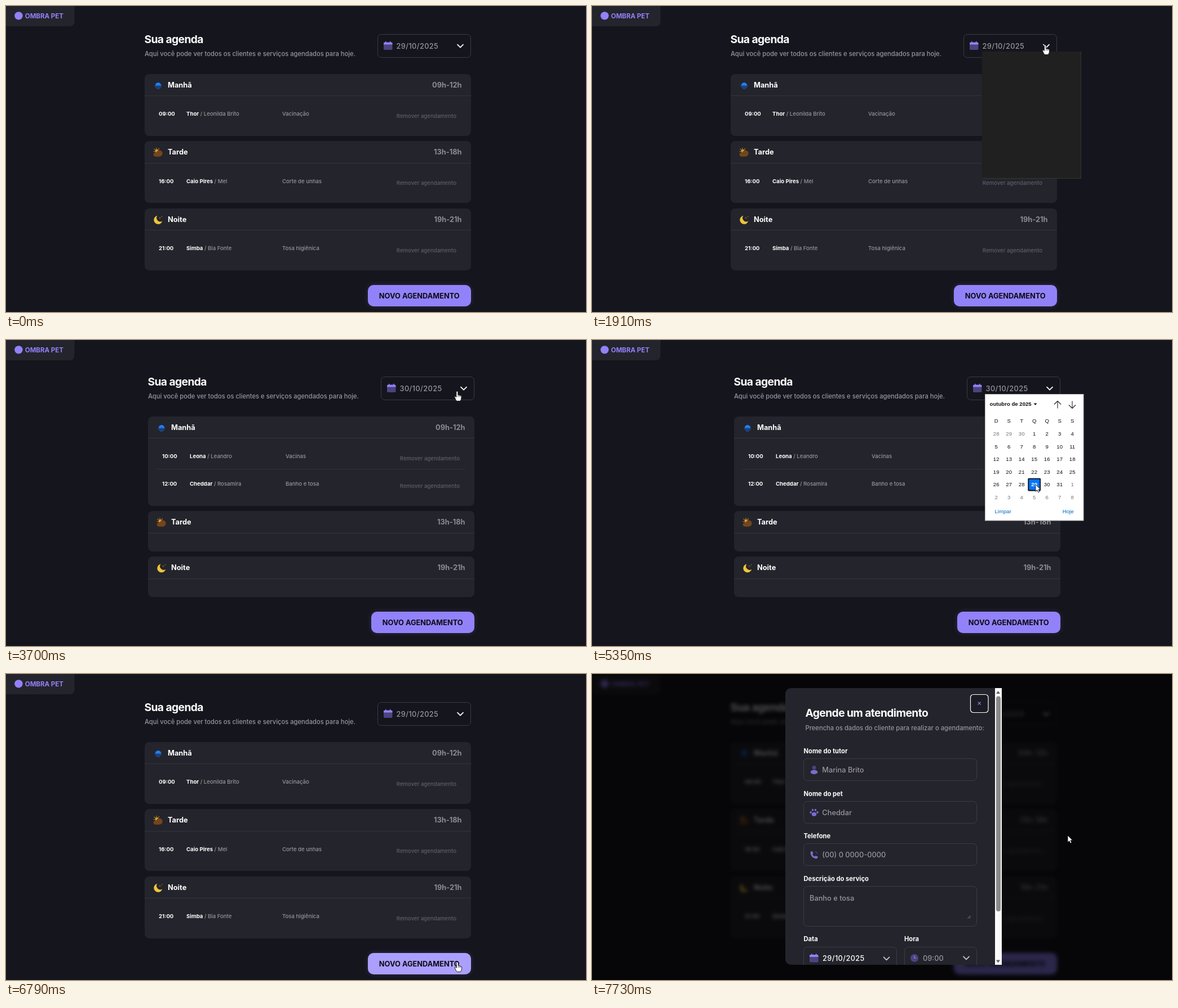
An HTML page for the animation above (8000 ms loop, 1029x544 px).

```html
<!DOCTYPE html>
<html lang="pt-BR">
<head>
<meta charset="utf-8">
<title>Agenda</title>
<style>
  html, body { margin: 0; width: 100%; height: 100%; overflow: hidden; background: #15151d; }
  svg { display: block; width: 1029px; height: 544px; }
  text { font-family: Inter, sans-serif; font-optical-sizing: none; white-space: pre; }
  .cal text { font-family: "Liberation Sans", Arial, sans-serif; }
  .button { filter: drop-shadow(0 0 4px rgba(146, 130, 250, .2)); }
</style>
</head>
<body>
<svg id="stage" viewBox="0 0 1029 544" xmlns="http://www.w3.org/2000/svg"></svg>
<script>
const LOOP = 8000;
const C = {
  bg: '#15151d', card: '#24242c', line: '#34343c', border: '#3b3b43', brand: '#9282fa', hover: '#ab9ffd',
  deep: '#4a4480', white: '#fff', soft: '#98959d', faint: '#5f5e68', blue: '#0067c0'
};

// ---- markup helpers ----
const attrs = o => Object.entries(o).map(([k, v]) => ` ${k}="${v}"`).join('');
const rect = (x, y, width, height, fill, rx = 0, more = {}) =>
  `<rect${attrs({ x, y, width, height, fill, rx, ...more })}/>`;
const outline = (x, y, w, h, r, color = C.border, width = 1) =>
  rect(x, y, w, h, 'none', r, { stroke: color, 'stroke-width': width });
const path = (d, fill, more = {}) => `<path${attrs({ d, fill, ...more })}/>`;
const stroke = (d, color, width = 1, more = {}) =>
  path(d, 'none', { stroke: color, 'stroke-width': width, ...more });
const dot = (cx, cy, r, fill) => `<circle${attrs({ cx, cy, r, fill })}/>`;
const oval = (cx, cy, rx, ry, fill) => `<ellipse${attrs({ cx, cy, rx, ry, fill })}/>`;
const group = (content, more = {}) => `<g${attrs(more)}>${content}</g>`;
const at = (x, y, content) => group(content, { transform: `translate(${x} ${y})` });

// y is the middle of the capitals; baselines sit on whole pixels
const text = (x, y, str, size, fill, weight = 500, more = {}) =>
  `<text${attrs({ x, y: Math.round(y + size * .364), 'font-size': size, fill, 'font-weight': weight, ...more })}>${str}</text>`;
const END = { 'text-anchor': 'end' }, MID = { 'text-anchor': 'middle' };
const TITLE = { 'letter-spacing': -.57 }, DATE = { 'letter-spacing': .4 };

const chevron = (x, y, color) =>
  stroke(`M${x - 5} ${y - 2.6}l5 5 5-5`, color, 1.8, { 'stroke-linecap': 'round', 'stroke-linejoin': 'round' });
const calendarIcon = (x, y) => at(x, y,
  rect(0, 2, 15.5, 13, C.deep, 1.8) + path('M0 5.6V3.4Q0 1.6 1.8 1.6H13.7Q15.5 1.6 15.5 3.4V5.6z', C.brand) +
  stroke('M3.8 .3V3M11.7 .3V3', C.brand, 1.4, { 'stroke-linecap': 'round' }));

// ---- schedule ----
const icons = [
  stroke('M-6.5 1.8H6.5M-5 4H5M-3 6.2H3', '#1a56b8', 1.2) +
    stroke('M-7.5-3l1.5 1M7.5-3L6-2M0-8v1.5', '#173a78', 1.1) + path('M-5.2 .8a5.2 5.5 0 0 1 10.4 0z', '#2080f0'),
  dot(-2.5, -2.5, 3, '#d99a2c') +
    stroke('M-3-8v1.6M-7-6l1.3 1.2M-8-1.5h1.6M1.5-6.5L.5-5.3', '#c98d28', 1.1, { 'stroke-linecap': 'round' }) +
    path('M-5 7.5a3.6 3.6 0 0 1-1-7q1.5-.5 2.6 0a5.6 5.6 0 1 1 5.6 7z', '#74451b'),
  path('M-1.5-7A7.6 7.6 0 1 0 7.2 2.6 6.6 6.6 0 0 1-1.5-7z', '#eec53a') +
    stroke('M3-4.8v3.2M1.4-3.2h3.2M6.6-6.6v2M5.6-5.6h2', '#75612a', 1)
];
const periods = [['Manhã', '09h-12h'], ['Tarde', '13h-18h'], ['Noite', '19h-21h']];

function schedule(days) {
  let y = 120.6, out = '';
  days.forEach((rows, i) => {
    const height = 71.4 + (rows.length ? 38.6 + 49 * (rows.length - 1) : 0);
    const top = Math.round(y);
    out += rect(246, top, 579, Math.round(y + height) - top, C.card, 8) +
      stroke(`M246 ${Math.floor(y + 39) + .5}H825`, C.line, 1);
    out += at(270, y + 20, icons[i]);
    out += text(287, y + 19.6, periods[i][0], 12.8, C.white, 700);
    out += text(808.5, y + 19.6, periods[i][1], 12.8, '#8d8b93', 700, END);
    rows.forEach(([time, pet, owner, service], r) => {
      const ry = y + 71.1 + 49 * r;
      if (r) out += stroke(`M261.5 ${Math.floor(ry - 26) + .5}H808.5`, C.line, 1);
      out += text(271, ry, time, 9.6, C.white, 700) +
        text(320, ry, `${pet}<tspan font-weight="500" fill="${C.soft}"> / ${owner}</tspan>`, 9.6, C.white, 700) +
        text(490, ry, service, 9.6, C.soft) +
        text(799, ry + 3.6, 'Remover agendamento', 9.6, C.faint, 500, { ...END, class: 'remove', 'data-y': ry + 3.6 });
    });
    y += height + 9.6;
  });
  const by = Math.round(y + 16.5);
  return out + rect(642, by, 183, 38, C.brand, 10, { class: 'button', 'data-y': by }) +
    text(733.3, by + 19.3, 'NOVO AGENDAMENTO', 12.8, '#0c0b14', 700, MID);
}

const dayOne = schedule([
  [['09:00', 'Thor', 'Leonilda Brito', 'Vacinação']],
  [['16:00', 'Caio Pires', 'Mel', 'Corte de unhas']],
  [['21:00', 'Simba', 'Bia Fonte', 'Tosa higiênica']]
]);
const dayTwo = schedule([
  [['10:00', 'Leona', 'Leandro', 'Vacinas'], ['12:00', 'Cheddar', 'Rosamira', 'Banho e tosa']], [], []
]);

const header =
  text(245.5, 59, 'Sua agenda', 19.2, C.white, 700, TITLE) +
  text(246, 85.3, 'Aqui você pode ver todos os clientes e serviços agendados para hoje.', 11.2, C.soft) +
  outline(659.5, 50.5, 165, 41, 6.4) + calendarIcon(670, 63) +
  text(692.5, 71, '', 12.8, C.soft, 500, { ...DATE, id: 'date' }) + chevron(806, 71.2, C.white);

// ---- date picker ----
const cellX = i => 20.2 + 22.5 * (i % 7), cellY = i => 71 + 22.5 * Math.floor(i / 7);
function picker() {
  let out = rect(.5, .5, 174.5, 224.5, C.white, 0, { stroke: '#b8b8b8' }) +
    text(8.6, 18, 'outubro de 2025', 9.6, '#101010', 700) + path('M86.5 16.5h6l-3 3.4z', '#101010') +
    stroke('M129 25.5v-13M123 18.5l6-6 6 6M155 12.5v13M149 19.5l6 6 6-6', '#202020', 1.1);
  [...'DSTQQSS'].forEach((d, i) => out += text(cellX(i), 48, d, 9.6, '#101010', 400, MID));
  for (let i = 0; i < 42; i++) {
    const n = i - 2, inside = n > 0 && n < 32;
    out += text(cellX(i), cellY(i), inside ? n : n < 1 ? n + 30 : n - 31, 9.6, inside ? '#101010' : '#767676', 400, MID);
  }
  out += outline(cellX(31) - 10.7, cellY(31) - 10.7, 21.4, 21.4, 0, '#606060');
  for (const day of [29, 30]) {
    const x = cellX(day + 2), y = cellY(day + 2);
    out += group(rect(x - 10.3, y - 10.3, 20.8, 20.8, '#0075ff', 1, { stroke: '#101010', 'stroke-width': 1.8 }) +
      text(x, y, day, 9.6, C.white, 700, MID), { id: 'pick' + day });
  }
  return out + text(17.5, 208.5, 'Limpar', 9.6, C.blue, 400) + text(157.5, 208.5, 'Hoje', 9.6, C.blue, 400, END) +
    rect(0, 0, 175.5, 225.5, '#202020', 0, { id: 'blank', stroke: '#202020', 'stroke-width': .4 });
}

// ---- booking form ----
const purple = '#7a6ccf';
const fieldIcons = [
  dot(0, -4, 3.3, C.deep) + oval(0, 4, 6.3, 3.8, purple),
  oval(0, 3.2, 4.2, 3.5, purple) + [[-6, 0], [-2.5, -4.2], [2.5, -4.2], [6, 0]].map(([x, y]) => oval(x, y, 1.7, 2.1, purple)).join(''),
  path('M-6.5-4.5q1-2 3.2-2.3l2 4.2-1.6 1.8q1.4 2.6 3.9 3.8L2.7 1.3 6.8 3.2q-.3 3-3.3 3.6Q-6.5 5-6.5-4.5z', purple) +
    stroke('M1.5-6a6 6 0 0 1 4.5 4.5', C.deep, 1.3)
];
function form() {
  let out = rect(343, 25, 384, 492, C.card) +
    text(378.5, 69.5, 'Agende um atendimento', 19.2, C.white, 700, TITLE) +
    text(378.5, 95.6, 'Preencha os dados do cliente para realizar o agendamento:', 11.2, C.soft) +
    rect(671.5, 36.5, 31.5, 32, '#1b1b23', 5, { stroke: C.white, 'stroke-width': 1.2 }) +
    stroke('M684.7 49.7l5 5m0-5l-5 5', C.brand, 1.1);
  [['Nome do tutor', 'Marina Brito'], ['Nome do pet', 'Cheddar'], ['Telefone', '(00) 0 0000-0000']].forEach(([label, hint], i) => {
    const y = 170.4 + 75.6 * i;
    out += text(375.5, y - 33.2, label, 11.2, C.white, 700) + outline(375.5, Math.floor(y - 20) + .5, 307, 39, 6.4) +
      at(394, y, fieldIcons[i]) + text(408.3, y, hint, 12.8, C.soft);
  });
  out += text(375.5, 364, 'Descrição do serviço', 11.2, C.white, 700) + outline(375.5, 377.5, 307, 71, 6.4) +
    text(386, 398.6, 'Banho e tosa', 12.8, C.soft) + stroke('M666.5 434.5l5-5M669.5 434.5l2-2', C.soft, .9) +
    text(375.5, 471.4, 'Data', 11.2, C.white, 700) + text(554, 471.4, 'Hora', 11.2, C.white, 700) +
    outline(375.5, 485.5, 165, 41, 6.4) + outline(554.5, 485.5, 128, 41, 6.4) +
    calendarIcon(386, 497.5) + text(409, 505.5, '29/10/2025', 12.8, C.white, 500, DATE) + chevron(522.5, 506, '#c8c7cc') +
    dot(572, 505, 7, C.deep) + stroke('M572 500.8v4.2h3.4', C.brand, 1.2) +
    text(587, 505, '09:00', 12.8, C.soft) + chevron(664, 505, '#c8c7cc');
  return out + rect(715, 25, 12, 492, '#fafafa') + rect(717, 39.5, 8, 382.5, '#8a8a8a', 4) +
    path('M717 35l3.5-5 3.5 5zM717 508.5l3.5 5 3.5-5z', '#606060');
}

document.getElementById('stage').innerHTML =
  `<clipPath id="sheet">${rect(343, 25, 400, 492, '#000', 10)}</clipPath>` +
  rect(0, 0, 1029, 544, C.bg) +
  group(
    group(header + group(dayOne, { id: 'dayOne' }) + group(dayTwo, { id: 'dayTwo' }), { id: 'content' }) +
    group(picker(), { id: 'picker', class: 'cal' }) +
    path('M0 0H121.5V27Q121.5 36 112.5 36H0z', C.card) + dot(22.4, 17.4, 7.2, C.brand) +
    text(33.8, 17.6, 'OMBRA PET', 11.5, C.brand, 700), { id: 'page' }) +
  group(rect(0, 0, 1029, 544, '#000', 0, { opacity: .7 }) + group(form(), { 'clip-path': 'url(#sheet)' }), { id: 'modal' }) +
  group(
    path('M0 0V12.3L2.8 9.7 4.8 14 6.9 13 5 8.8H8.7z', C.white, { stroke: '#111', 'stroke-width': .8, id: 'arrow' }) +
    path('M-1.6 10.6V1.5a1.5 1.5 0 0 1 3 0V6.6l4.6 1q2 .5 1.7 2.5l-.7 4.2q-.5 3.2-3 3.2H.2q-1.4 0-2.4-1.6L-4.5 11q-.9-2 .9-1.9z',
      C.white, { stroke: '#111', 'stroke-width': .9, id: 'hand' }) +
    stroke('M1.4 6.6v4M3.7 7.4v3.2M5.8 8v2.6', '#333', .7, { id: 'knuckles' }), { id: 'cursor' });

// ---- timeline ----
const $ = Object.fromEntries([...document.querySelectorAll('svg [id]')].map(e => [e.id, e]));
const removers = [...$.dayOne.querySelectorAll('.remove')];
const buttons = [...document.querySelectorAll('.button')];
const show = (el, on) => el.style.display = on ? '' : 'none';
const move = (el, x, y) => el.setAttribute('transform', `translate(${x} ${y})`);
const between = (t, a, b) => t >= a && t < b;

// time, x, y of the pointer tip
const route = [
  [300, 818, 546], [440, 812, 515], [620, 804, 462], [880, 799, 320], [1050, 796, 197], [1120, 795, 160],
  [1190, 797, 135], [1510, 804, 69], [1990, 804, 69], [2250, 806, 150], [2580, 806, 233], [3010, 806, 233],
  [3410, 801, 95], [3550, 799, 94], [3700, 800.5, 91], [4200, 800.5, 91], [4215, 797, 81], [4540, 797, 81],
  [4800, 790, 180], [5010, 787, 257], [5480, 787, 257], [5880, 876, 300], [6180, 876, 300], [6350, 874, 312],
  [6790, 801, 512], [7090, 800, 511], [7300, 952, 400], [7420, 945, 360], [7730, 844, 287], [LOOP, 844, 287]
];
function pointer(t) {
  const i = Math.max(1, route.findIndex(k => k[0] > t));
  const [t0, x0, y0] = route[i - 1], [t1, x1, y1] = route[i];
  const p = Math.max(0, (t - t0) / (t1 - t0));
  return [x0 + (x1 - x0) * p, y0 + (y1 - y0) * p];
}

function render(t) {
  const [x, y] = pointer(t);
  const second = between(t, 3010, 5470), modal = t >= 7160;
  const open = between(t, 1790, 3010) || between(t, 4360, 5470);
  const scroll = 1 - Math.min(1, Math.max(0, (t - 6180) / 180));
  const dx = second ? 6 : 0, dy = t < 3010 ? 0 : Math.round(15 * scroll);
  move($.content, dx, dy);
  show($.dayOne, !second);
  show($.dayTwo, second);
  $.date.textContent = between(t, 2850, 5470) ? '30/10/2025' : '29/10/2025';

  show($.picker, open);
  move($.picker, second ? 697 : 692, 81 + dy);
  show($.blank, t < 1980 || between(t, 4360, 4540));
  const picked = between(t, 2850, 5280) ? 30 : 29;
  show($.pick29, picked === 29);
  show($.pick30, picked === 30);

  const px = x - dx, py = y - dy;
  const free = !modal && !open;
  let hand = free && px > 659 && px < 825 && py > 50 && py < 92 || between(t, 1790, 1980) || between(t, 4360, 4540);
  for (const b of buttons) {
    const by = +b.dataset.y;
    const over = free && (b.closest('#dayTwo') !== null) === second && px > 642 && px < 825 && py > by && py < by + 38;
    b.setAttribute('fill', over ? C.hover : C.brand);
    hand = hand || over;
  }
  for (const r of removers) {
    const over = free && !second && px > 692 && px < 800 && Math.abs(py - r.dataset.y) < 9;
    r.setAttribute('fill', over ? C.soft : C.faint);
    hand = hand || over;
  }

  $.page.style.filter = modal ? 'blur(3px)' : '';
  show($.modal, modal);
  show($.cursor, t >= 370);
  move($.cursor, x, y);
  show($.arrow, !hand);
  show($.hand, hand);
  show($.knuckles, hand);
}

const start = performance.now();
function frame() {
  render((performance.now() - start) % LOOP);
  requestAnimationFrame(frame);
}
frame();
</script>
</body>
</html>
```
